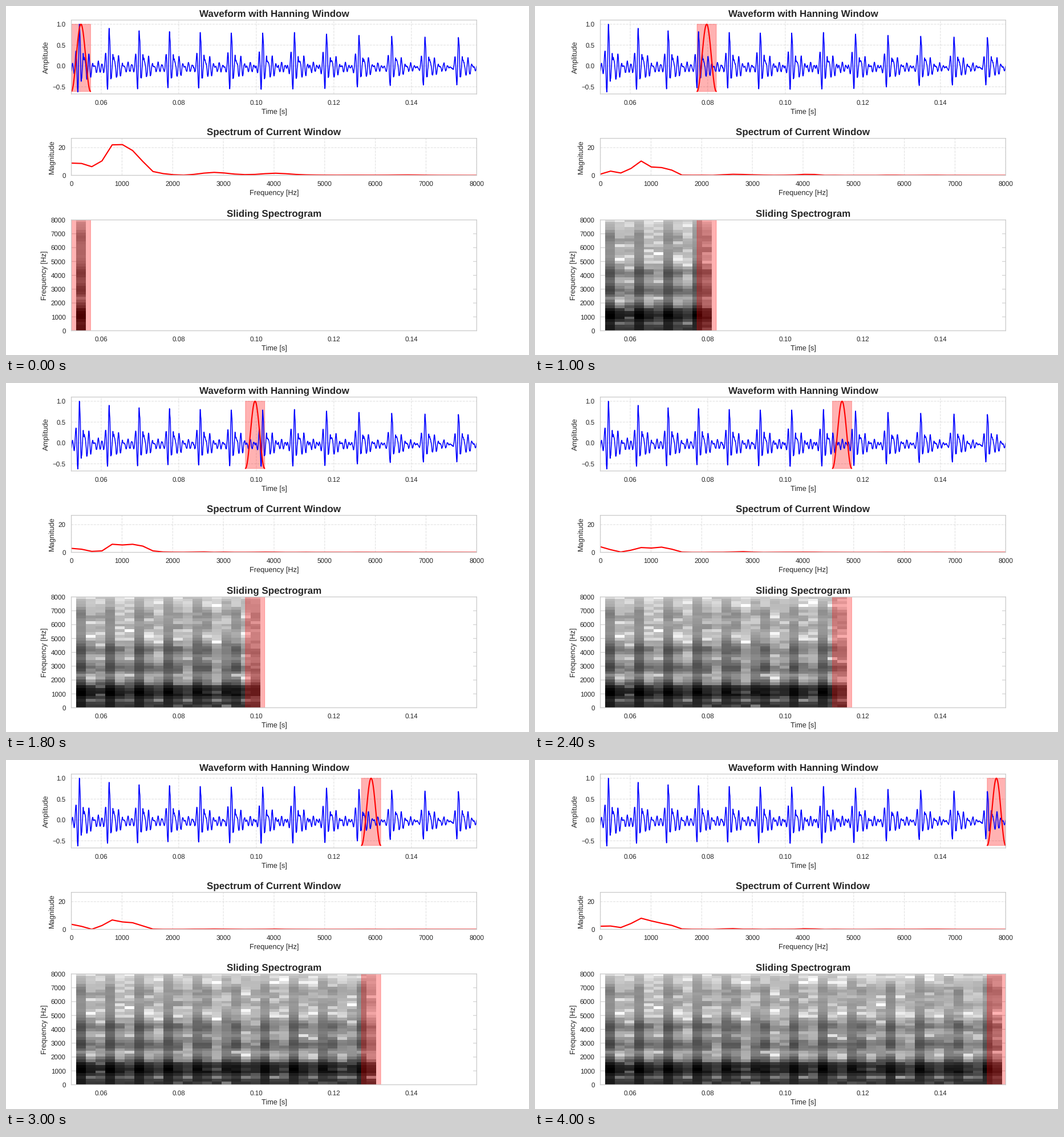
Write a matplotlib script that moves like this. It is 917 by 611 pixels and loops after 4100 ms.

```python
import numpy as np
import matplotlib.pyplot as plt
from matplotlib.animation import FuncAnimation
from matplotlib.patches import Rectangle

W, H, DPI = 917, 611, 100
S = W / 12 / DPI                      # point scale of a 12 inch wide layout
LEFT, RIGHT = 114.6, 825.3
RATE, T0, COUNT = 44100, 0.0523, 4610
WIN, HOP, FRAMES = 219, 110, 41
ROWS = 40
LOW, HIGH = -0.61, 1.0
DB_MIN, DB_MAX = -50, 27

plt.rcParams.update({
    "font.family": "Liberation Sans", "text.hinting": "none",
    "path.snap": False,
    "text.color": ".15", "axes.labelcolor": ".15",
    "xtick.color": ".15", "ytick.color": ".15",
    "axes.edgecolor": ".8", "axes.linewidth": 1.25 * S,
    "axes.labelsize": 12 * S, "axes.labelpad": 4 * S,
    "axes.titlesize": 16 * S, "axes.titleweight": "bold",
    "axes.titlepad": 6 * S, "axes.axisbelow": True,
    "xtick.labelsize": 11 * S, "ytick.labelsize": 11 * S,
    "xtick.major.size": 0, "ytick.major.size": 0,
    "xtick.major.pad": 9.5 * S, "ytick.major.pad": 9.5 * S,
    "grid.color": ".8", "grid.linewidth": 1 * S,
    "lines.solid_capstyle": "round",
})

# High formants: frequency in Hz and level
BANDS = [(2800, .08), (4050, .06), (5750, .010), (6600, .012)]


def wave(freq, t):
    return np.cos(2 * np.pi * freq * t)


def bell(t, width):
    return np.exp(-(t / width) ** 2)


def pulse(t):
    """One vowel pulse with its main peak at t = 0 (t in ms)."""
    before = wave(1.045, t) * bell(t, 1.03)
    after = np.maximum(t, 0)
    ring = (0.68 * wave(0.83, after) * np.exp(-after / 2.65)
            + 0.32 * wave(1.23, after) * np.exp(-after / 4.4))
    ring *= 0.8 + 0.2 * bell(after, 0.44)
    y = np.where(t < 0, before, ring) + 0.22 * bell(t - 0.3, 0.9)

    s = np.maximum(t + 0.6, 0)
    rise = s / 0.6 * np.exp(1 - s / 0.6)
    for freq, level in BANDS:
        y += level * rise * np.sin(2 * np.pi * freq / 1000 * s)
    return y


def breath():
    """Faint noise, stronger around the high formants."""
    white = np.random.default_rng(7).normal(size=COUNT)
    f = np.fft.rfftfreq(COUNT, 1 / RATE)
    gain = 0.0022 + sum(0.4 * level * bell(f - freq, 380)
                        for freq, level in BANDS)
    return np.fft.irfft(np.fft.rfft(white) * gain, COUNT)


def make_voice():
    ms = np.arange(COUNT) / RATE * 1000
    y = breath() - 0.04
    for k in range(-1, 14):
        peak = 2.12 + 7.605 * k + 0.045 * k * k     # slowly falling pitch
        height = 0.65 + 0.33 * np.exp(-k / 6)
        y += height * pulse(ms - peak)
    return y / y.max()


t = T0 + np.arange(COUNT) / RATE
voice = make_voice()
freqs = np.fft.rfftfreq(WIN, 1 / RATE)


def window_at(k):
    part = slice(k * HOP, min(k * HOP + WIN, COUNT))
    return part, np.hanning(part.stop - part.start)


def spectrum_at(k):
    part, hann = window_at(k)
    return np.abs(np.fft.rfft(voice[part] * hann, WIN))


spectra = np.array([spectrum_at(k) for k in range(FRAMES)])
spectra *= 22.2 / spectra.max()
levels = 20 * np.log10(spectra[:, :ROWS].T + 1e-4)

fig = plt.figure(figsize=(W / DPI, H / DPI), dpi=DPI, facecolor="white")


def panel(top, bottom, title, xlabel, ylabel):
    ax = fig.add_axes([LEFT / W, 1 - bottom / H,
                       (RIGHT - LEFT) / W, (bottom - top) / H])
    ax.set_title(title)
    ax.set_xlabel(xlabel)
    ax.set_ylabel(ylabel)
    return ax


def time_axis(ax):
    ax.set_xlim(T0, T0 + COUNT / RATE)
    ax.set_xticks(np.arange(0.06, 0.15, 0.02))


def red_box(ax, y0, y1):
    box = Rectangle((T0, y0), WIN / RATE, y1 - y0, color="red", alpha=0.3,
                    lw=1 * S, zorder=1.5)
    return ax.add_patch(box)


wave_ax = panel(24.6, 154, "Waveform with Hanning Window",
                "Time [s]", "Amplitude")
spec_ax = panel(231.7, 296.5, "Spectrum of Current Window",
                "Frequency [Hz]", "Magnitude")
gram_ax = panel(374.5, 568.5, "Sliding Spectrogram",
                "Time [s]", "Frequency [Hz]")

wave_ax.plot(t, voice, color="blue", lw=1.5 * S)
hann_line, = wave_ax.plot([], [], color="red", lw=2 * S)
wave_box = red_box(wave_ax, LOW, HIGH)
time_axis(wave_ax)
wave_ax.set_ylim(1.1 * LOW, 1.1 * HIGH)
wave_ax.set_yticks([-0.5, 0, 0.5, 1])

spec_line, = spec_ax.plot([], [], color="red", lw=2 * S)
spec_ax.set_xlim(0, 8000)
spec_ax.set_ylim(0, 26.7)
spec_ax.set_yticks([0, 20])

for ax in (wave_ax, spec_ax):
    ax.grid(True, linestyle="--", alpha=0.6)

first = T0 + (WIN - HOP) / 2 / RATE
gram = gram_ax.imshow(
    np.full(levels.shape, DB_MIN), cmap="gray_r", vmin=DB_MIN, vmax=DB_MAX,
    origin="lower", aspect="auto", interpolation="nearest", zorder=1,
    extent=[first, first + FRAMES * HOP / RATE, 0, ROWS * freqs[1]])
gram_box = red_box(gram_ax, 0, 8000)
time_axis(gram_ax)
gram_ax.set_ylim(0, 8000)
gram_ax.set_yticks(range(0, 8001, 1000))
gram_ax.grid(True)


def draw(k):
    part, hann = window_at(k)
    hann_line.set_data(t[part], LOW + (HIGH - LOW) * hann)
    spec_line.set_data(freqs, spectra[k])
    for box in (wave_box, gram_box):
        box.set_x(t[part.start])
        box.set_width((part.stop - part.start) / RATE)
    gram.set_data(np.where(np.arange(FRAMES) <= k, levels, DB_MIN))
    return hann_line, spec_line, wave_box, gram_box, gram


anim = FuncAnimation(fig, draw, frames=FRAMES, interval=100,
                     repeat=True, repeat_delay=0, blit=False)
plt.show()
```
